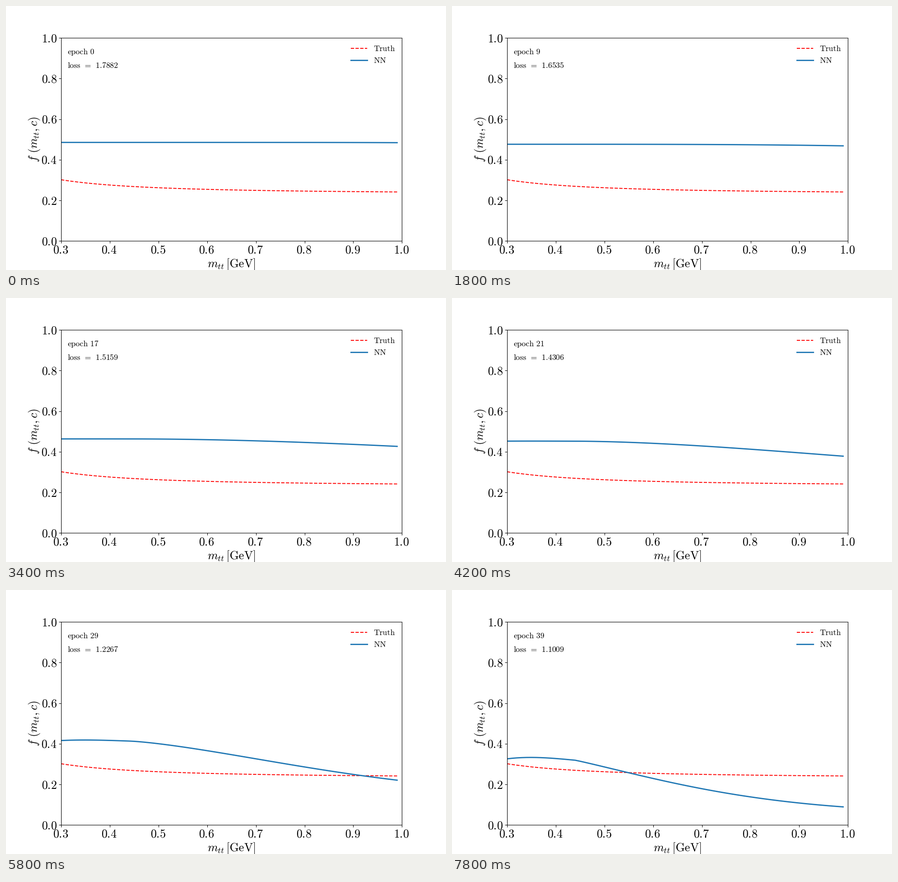
Animation of 966x580 px, one loop 8000 ms. Source, as a matplotlib script:

```python
import numpy as np
import matplotlib.pyplot as plt
from matplotlib.animation import FuncAnimation

W, H, DPI = 966, 580, 100
LEFT, RIGHT, TOP, BOTTOM = 120.75, 869.4, 70.2, 516.3
FRAMES, INTERVAL = 40, 200
BIG, SMALL = 18.6, 12.7
KINK = 0.44

plt.rcParams["mathtext.fontset"] = "cm"

# Training loss at a few epochs
KEY_EPOCH = np.array([0, 5, 13, 21, 29, 34, 39])
KEY_LOSS = np.array([1.7882, 1.7116, 1.5908, 1.4306, 1.2267, 1.1327, 1.1009])


def smooth(x, kx, ky):
    """Cubic Hermite interpolation through key points."""
    slope = np.gradient(ky, kx)
    i = np.clip(np.searchsorted(kx, x, side="right") - 1, 0, len(kx) - 2)
    h = kx[i + 1] - kx[i]
    t = (x - kx[i]) / h
    return ((1 + 2 * t) * (1 - t) ** 2 * ky[i] + t * (1 - t) ** 2 * h * slope[i]
            + t * t * (3 - 2 * t) * ky[i + 1] + t * t * (t - 1) * h * slope[i + 1])


def sigmoid(z):
    return 1 / (1 + np.exp(-z))


def truth(x):
    return 0.23115 + 0.01028 * x ** -1.6


def network(x, epoch):
    """Sigmoid output: a sinking level, a bump left of the kink, a drop right of it."""
    level = 0.058 + 0.0038 * epoch + 0.33 * (epoch / 34) ** 3.75
    drop = 1.75 * sigmoid(0.205 * (epoch - 28.6))
    power = 0.85 + 0.45 * np.exp(-0.08 * (epoch - 29))
    u = np.maximum(x - KINK, 0) / 0.55
    w = np.maximum(KINK - x, 0)
    bump = 0.42 * drop ** 2 * w * (1 - 40 * w ** 2)
    fall = drop * (u ** power + 0.3 * u ** 2 * (1 - u))
    return sigmoid(bump - level - fall)


fig = plt.figure(figsize=(W / DPI, H / DPI), dpi=DPI, facecolor="white")
ax = fig.add_axes([LEFT / W, 1 - BOTTOM / H, (RIGHT - LEFT) / W, (BOTTOM - TOP) / H])
ax.set(xlim=(0.3, 1.0), ylim=(0, 1))
ax.set_xticks(np.linspace(0.3, 1.0, 8))
ax.set_yticks(np.linspace(0, 1, 6))
ax.tick_params(labelbottom=False, labelleft=False)

# Overlay in pixel coordinates for all text and the legend
page = fig.add_axes([0, 0, 1, 1])
page.set(xlim=(0, W), ylim=(H, 0))
page.axis("off")


def label(x, y, tex, size=BIG, **kw):
    return page.text(x, y, f"${tex}$", fontsize=size, va="baseline", **kw)


def roman(s):
    return rf"\mathrm{{{s}}}"


for k in range(8):
    label(LEFT - 1.2 + k * (RIGHT - LEFT) / 7, 544, roman(f"{0.3 + 0.1 * k:.1f}"), ha="center")
for k in range(6):
    label(111.5, BOTTOM - k * (BOTTOM - TOP) / 5 + 9, roman(f"{0.2 * k:.1f}"), ha="right")
label(495, 574.4, r"m_{tt}\," + roman("[GeV]"), ha="center")
label(69, 293.5, r"f\ (m_{tt},c)", ha="center", rotation=90, rotation_mode="anchor")

x = np.arange(0.3, 0.995, 0.01)
truth_style = dict(color="red", lw=1.4, ls="--")
nn_style = dict(color="#1f77b4", lw=2)
ax.plot(x, truth(x), **truth_style)
nn_line, = ax.plot([], [], **nn_style)

for y, name, style in [(93, "Truth", truth_style), (119, "NN", nn_style)]:
    page.plot([757.3, 793.4], [y, y], **style)
    label(807, y + 6.3, roman(name), SMALL)

epoch_text = label(135, 106, "", SMALL)
loss_text = label(135, 136, "", SMALL)


def update(epoch):
    nn_line.set_data(x, network(x, epoch))
    loss = smooth(epoch, KEY_EPOCH, KEY_LOSS)
    epoch_text.set_text(f"${roman('epoch')}" + r"\hspace{0.38}" + f"{roman(epoch)}$")
    gap = r"\hspace{0.46}"
    loss_text.set_text(f"${roman('loss')}{gap}={gap}{roman(f'{loss:.4f}')}$")
    return nn_line, epoch_text, loss_text


anim = FuncAnimation(fig, update, frames=FRAMES, interval=INTERVAL,
                     init_func=lambda: update(0), repeat=True, repeat_delay=0)
plt.show()
```
